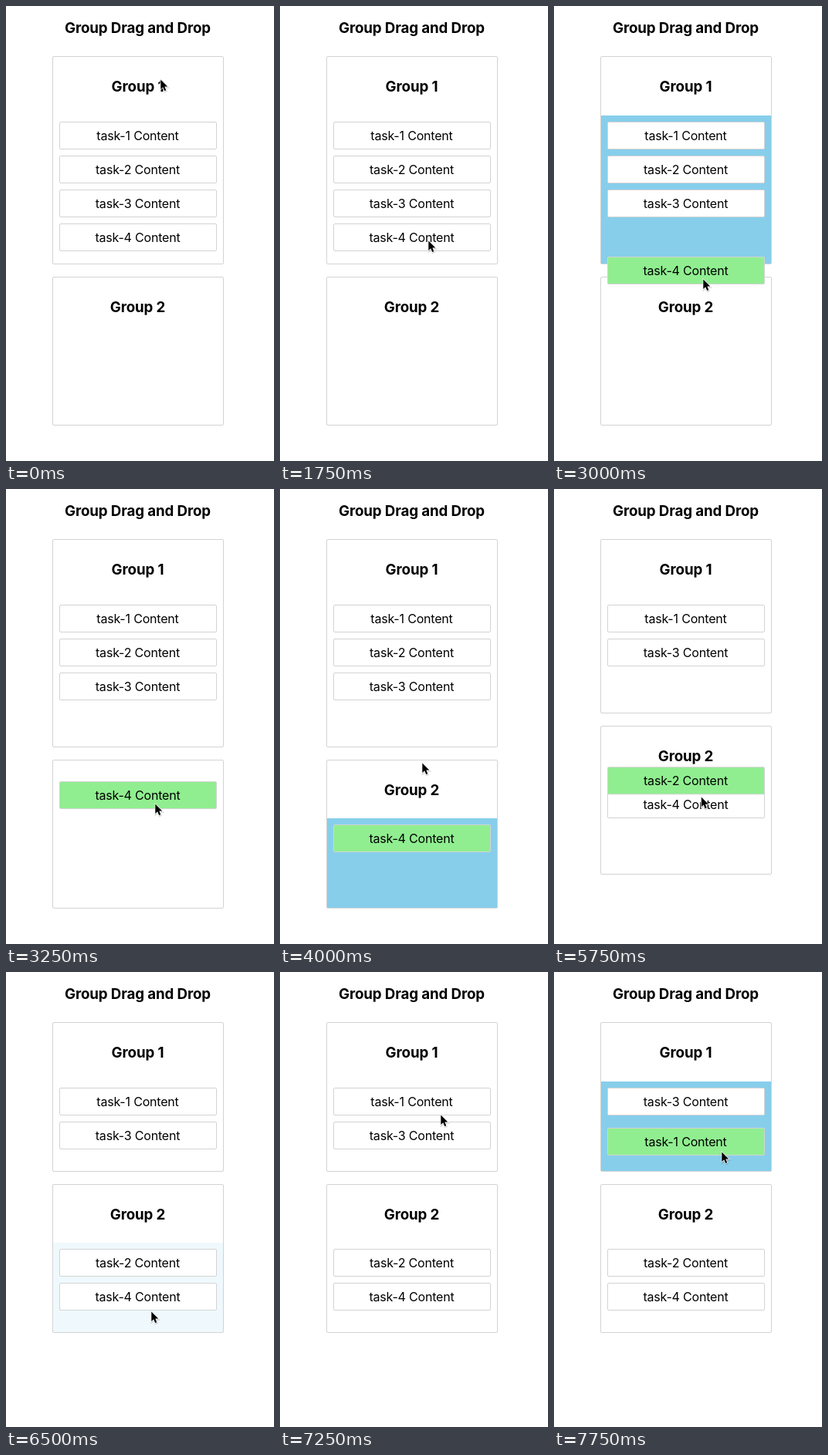
An HTML page for the animation above (8000 ms loop, 347 by 590 pixels).

```html
<!DOCTYPE html>
<html lang="en">
<head>
<meta charset="utf-8">
<title>Group Drag and Drop</title>
<style>
html, body { margin: 0; width: 100%; height: 100%; overflow: hidden; background: #fff; }
svg { display: block; width: 347px; height: 590px; }
text { font: 16px Inter, "Open Sans", sans-serif; letter-spacing: -.012em; text-anchor: middle; }
.head { font-size: 18.72px; font-weight: 700; letter-spacing: -.006em; }
.box { stroke: lightgrey; }
</style>
</head>
<body>
<svg id="stage" viewBox="0 0 347 590"></svg>
<script>
const STEP = 250, STEPS = 32, ROW = 44, CARD = 36, PAD = 8;
const stage = document.getElementById('stage');

// Key points of the pointer tip: step, x, y
const pointer = [
  [0, 200, 95], [3, 179, 225], [7, 192, 304], [10, 192, 304], [12, 193, 354], [14, 193, 462],
  [16, 184, 355], [20, 190, 220], [21, 192, 317], [24, 190, 428], [26, 188, 440], [29, 208, 185], [31, 217, 233]
];

// grip: pointer height above the card's top edge; slot: where the released card settles
const drags = [
  { task: 4, grab: 11, drop: 15, end: 17, grip: 29, slot: 435 },
  { task: 2, grab: 21, drop: 25, end: 26, grip: 39, slot: 391 },
  { task: 1, grab: 30, drop: STEPS, end: STEPS, grip: 31 }
];

function pointerAt(k) {
  const i = Math.max(1, pointer.findIndex(p => p[0] >= k));
  const [k0, x0, y0] = pointer[i - 1], [k1, x1, y1] = pointer[i];
  const t = (k - k0) / (k1 - k0), e = t * t * (3 - 2 * t);
  return [x0 + (x1 - x0) * e, y0 + (y1 - y0) * e];
}

// Every finished drag puts its card on top of the second group
function listsAt(k) {
  const lists = [[1, 2, 3, 4], []];
  for (const d of drags.filter(d => k >= d.end)) {
    lists[0] = lists[0].filter(task => task !== d.task);
    lists[1].unshift(d.task);
  }
  return lists;
}

const box = (x, y, w, h, fill) =>
  `<rect class="box" x="${x + .5}" y="${y + .5}" width="${w - 1}" height="${h - 1}" rx="1.5" fill="${fill}"/>`;

const heading = (label, y) => `<text class="head" x="170.5" y="${y}">${label}</text>`;

const card = (task, y, fill = '#fff') =>
  box(69, y, 204, CARD, fill) + `<text x="170.5" y="${y + 24}">task-${task} Content</text>`;

function arrow(x, y) {
  const d = 'M0 0V14.5L3.3 11.4 5.6 16.8 8 15.8 5.8 10.5H10.3Z';
  return `<g transform="translate(${x + .3} ${y + .4}) scale(.87)">` +
    `<path d="${d}" transform="translate(.5 1.2)" stroke="#000" stroke-width="2.5" opacity=".15"/>` +
    `<path d="${d}" stroke="#fff" stroke-width="1.6" paint-order="stroke"/></g>`;
}

function draw(k) {
  const [px, py] = pointerAt(k);
  const drag = drags.find(d => k >= d.grab && k < d.end);
  const dragY = drag && (k < drag.drop ? py - drag.grip : drag.slot);
  const probe = dragY + PAD;
  const landed = drags.some(d => d.end === k);
  let out = heading('Group Drag and Drop', 35), top = 65;

  listsAt(k).forEach((tasks, g) => {
    const listTop = top + (g ? 76 : 77);
    const bottom = listTop + Math.max(117, tasks.length * ROW + 17);
    const over = drag && probe >= listTop && probe < bottom;
    const light = over ? 1 : landed && g === 1 ? .13 : 0;

    out += box(60, top, 222, bottom - top, '#fff') + heading('Group ' + (g + 1), top + 46);
    out += `<rect x="61" y="${listTop}" width="220" height="${bottom - 1 - listTop}" fill="skyblue" opacity="${light}"/>`;

    // Cards below the dragged one make room for it
    tasks.filter(task => !drag || task !== drag.task).forEach((task, i) => {
      const y = listTop + PAD + i * ROW;
      out += card(task, over && probe <= y + CARD ? y + ROW : y);
    });
    top = bottom + 16;
  });

  if (drag) out += card(drag.task, dragY, 'lightgreen');
  stage.innerHTML = out + arrow(px, py);
}

const start = performance.now();
let shown = -1;
function tick() {
  const k = Math.floor((performance.now() - start) / STEP) % STEPS;
  if (k !== shown) draw(shown = k);
  requestAnimationFrame(tick);
}
tick();
</script>
</body>
</html>
```
